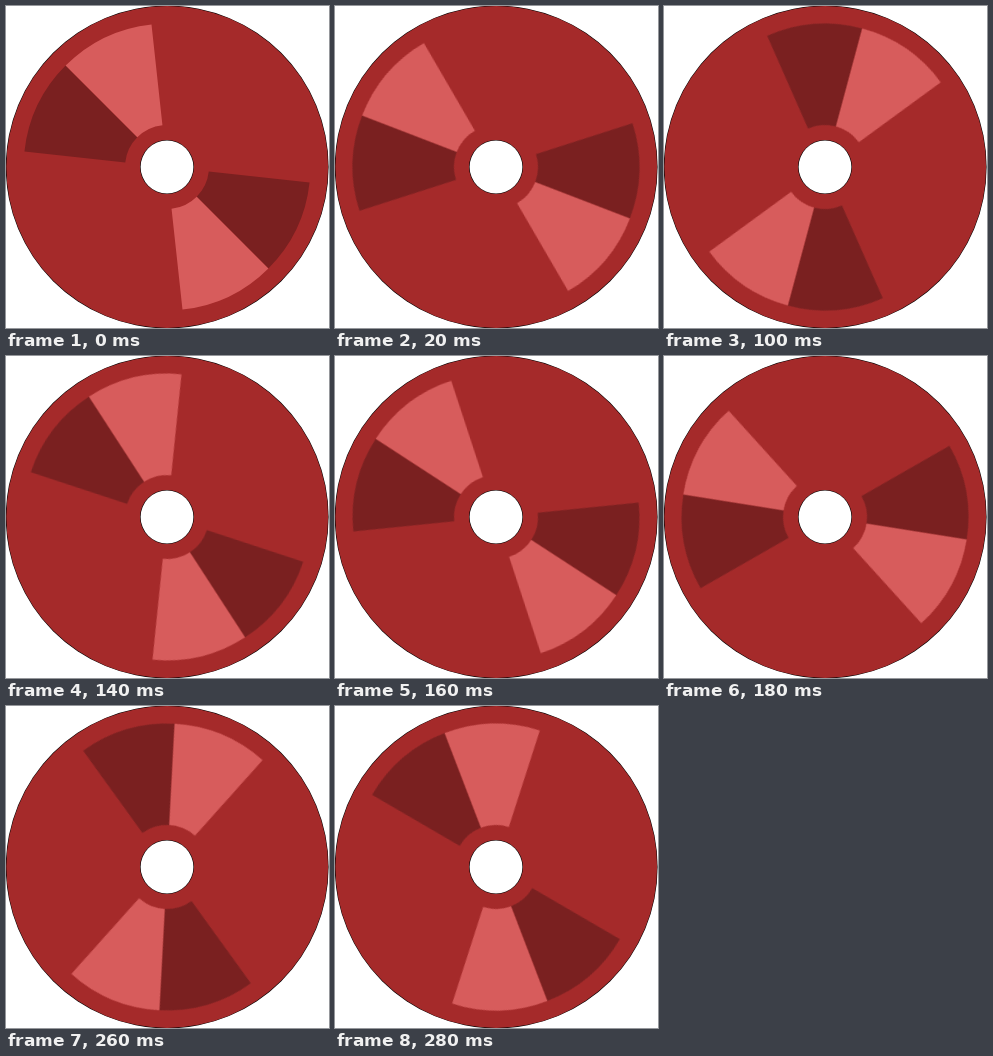
An HTML page for the animation above (0.3 s loop, 323 by 322 pixels).

```html
<!DOCTYPE html>
<html lang="en">
<head>
<meta charset="utf-8">
<title>Spinning disc</title>
<style>
  html, body { margin: 0; width: 100%; height: 100%; overflow: hidden; background: #fff; }
  svg { display: block; width: 323px; height: 322px; }
  #blades { transform-origin: 161px 161px; }
  .light { fill: #d75c5c; }
  .dark { fill: #7a2020; }
</style>
</head>
<body>
<svg viewBox="0 0 323 322">
  <circle cx="161.2" cy="161" r="161.4" fill="#000"/>
  <circle cx="161.2" cy="161" r="160.9" fill="#a52a2a"/>
  <g id="blades"></g>
  <circle cx="161" cy="161" r="27" fill="#000"/>
  <circle cx="161" cy="161" r="26.4" fill="#fff"/>
</svg>
<script>
  const C = 161, INNER = 42, OUTER = 143.4, SPAN = 38.8, EDGE = -45;
  const LOOP = 300, STEPS = 15;
  const blades = document.getElementById('blades');

  // Angles run clockwise from the top, in degrees.
  const point = (r, deg) => {
    const a = deg * Math.PI / 180;
    return `${(C + r * Math.sin(a)).toFixed(2)} ${(C - r * Math.cos(a)).toFixed(2)}`;
  };

  function addBlade(from, to, cls) {
    const path = document.createElementNS('http://www.w3.org/2000/svg', 'path');
    path.setAttribute('class', cls);
    path.setAttribute('d',
      `M${point(INNER, from)}L${point(OUTER, from)}` +
      `A${OUTER} ${OUTER} 0 0 1 ${point(OUTER, to)}` +
      `L${point(INNER, to)}A${INNER} ${INNER} 0 0 0 ${point(INNER, from)}Z`);
    blades.append(path);
  }

  for (const edge of [EDGE, EDGE + 180]) {
    addBlade(edge - SPAN, edge, 'dark');
    addBlade(edge, edge + SPAN, 'light');
  }

  blades.animate(
    [{ transform: 'rotate(0deg)' }, { transform: 'rotate(-360deg)' }],
    { duration: LOOP, iterations: Infinity, easing: `steps(${STEPS}, end)` }
  );
</script>
</body>
</html>
```
